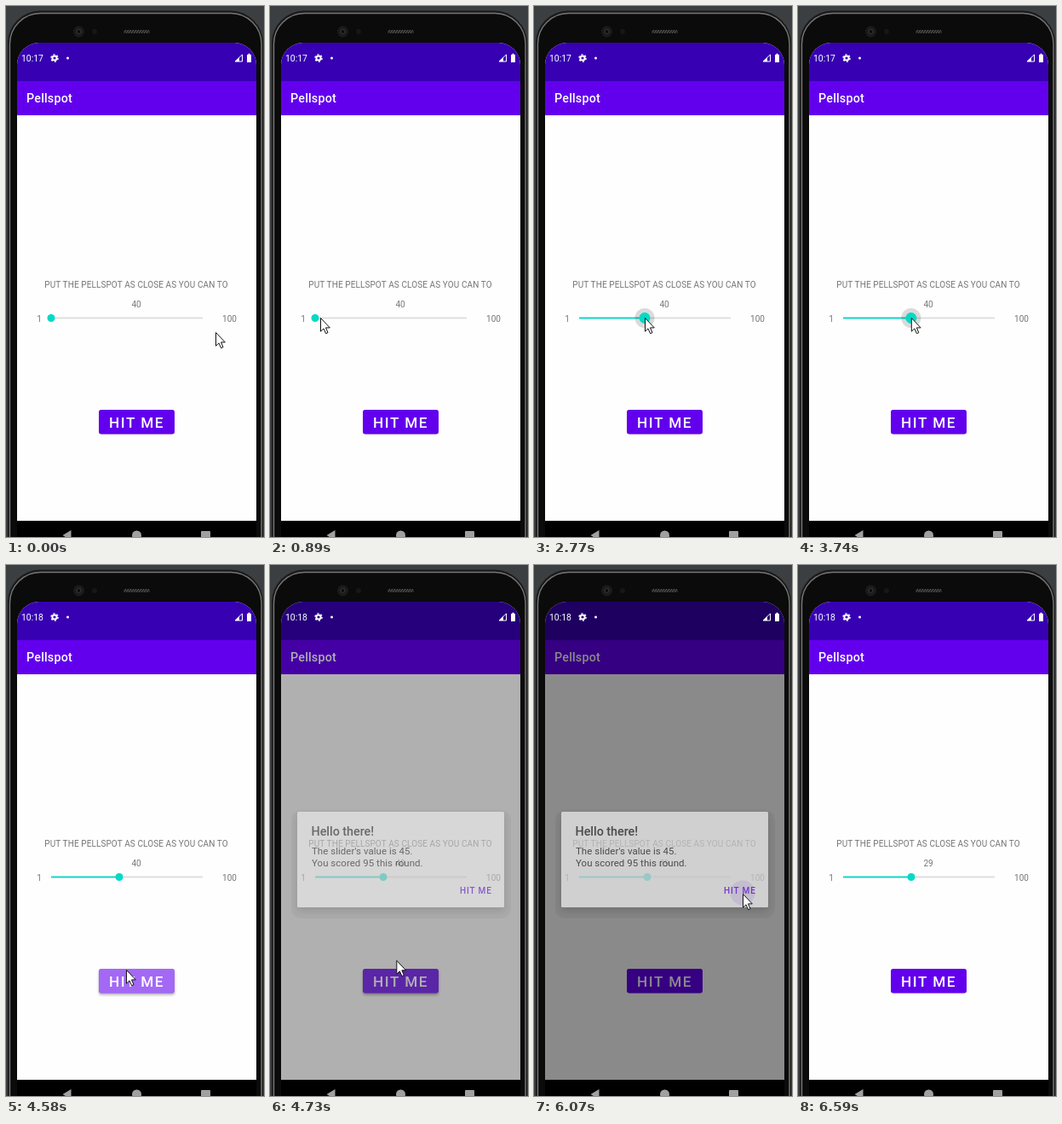
Write an HTML page that moves like this. It is 303 px wide and 622 px high and loops after 7.13 s.

```html
<!DOCTYPE html>
<html lang="en">
<head>
<meta charset="utf-8">
<title>Slider game</title>
<style>
  html, body { margin: 0; width: 100%; height: 100%; overflow: hidden; background: #3c3f41; }
  svg { display: block; width: 303px; height: 622px; }
  text { font: 10px Roboto, sans-serif; white-space: pre; }
  .label { fill: #757575; text-anchor: middle; }
  .medium { font-weight: 500; }
  .title { font-size: 14.3px; font-weight: 500; }
  .body { font-size: 11.44px; fill: #222; letter-spacing: .05px; }
  #button { filter: drop-shadow(0 .5px .5px rgba(0,0,0,.25)); }
  #button.down { filter: drop-shadow(0 2px 1.8px rgba(0,0,0,.3)); }
  #card { filter: drop-shadow(0 4px 5px rgba(0,0,0,.25)); }
</style>
</head>
<body>
<svg viewBox="0 0 303 622">
  <defs>
    <clipPath id="screen"><path d="M13 603V69a26 26 0 0 1 26-26H268a26 26 0 0 1 26 26V603z"/></clipPath>
    <pattern id="mesh" width="3" height="4" patternUnits="userSpaceOnUse">
      <path d="M0 4L3 0" stroke="#666" stroke-width=".8"/>
    </pattern>
  </defs>

  <!-- phone body -->
  <rect x="2" y="5.500" width="300" height="680" rx="38" fill="#1a1a1a"/>
  <rect x="4.500" y="8.500" width="295.500" height="680" rx="36" fill="#0b0b0b" stroke="#777" stroke-width="1.400"/>
  <circle cx="85.500" cy="30" r="6.500" fill="#1b1b1b"/>
  <circle cx="85.500" cy="30" r="2.500" fill="#0c0c0c" stroke="#3a3a3a"/>
  <circle cx="104" cy="30" r="3" fill="#171717"/>
  <rect x="138" y="28" width="31" height="4" rx="2" fill="#222"/>
  <rect x="138" y="28" width="31" height="4" rx="2" fill="url(#mesh)"/>
  <rect x="13" y="603" width="281" height="19"/>
  <g fill="#a0a0a0">
    <path d="M66.500 620L76.500 614V626z"/>
    <circle cx="153.500" cy="620" r="5.500"/>
    <rect x="229" y="615" width="11" height="11" rx="1"/>
  </g>

  <g clip-path="url(#screen)">
    <rect x="13" y="43" width="281" height="560" fill="#fefefe"/>
    <rect x="13" y="43" width="281" height="45" fill="#3700b3"/>
    <rect x="13" y="88" width="281" height="40" fill="#6200ee"/>
    <text class="title" x="24" y="113" fill="#fff" letter-spacing=".2">Pellspot</text>
    <text class="label" x="153" y="330" letter-spacing=".1">PUT THE PELLSPOT AS CLOSE AS YOU CAN TO</text>
    <text class="label" x="153" y="353" id="goal">40</text>
    <text class="label" x="39" y="369.500">1</text>
    <text class="label" x="262.500" y="369.500">100</text>

    <rect x="53" y="364.600" width="178" height="1.800" fill="#dcdcdc"/>
    <rect x="53" y="364.600" height="1.800" fill="#03dac5" id="fill"/>
    <circle cy="365.500" r="11.500" fill-opacity=".14" id="halo"/>
    <circle cy="365.500" fill="#03dac5" id="thumb"/>

    <g id="button">
      <rect x="109" y="473" width="89" height="28.500" rx="3" fill="#6200ee"/>
      <rect x="109" y="473" width="89" height="28.500" rx="3" fill="#fff" id="flash"/>
      <text class="medium" x="121" y="494" fill="#fff" style="font-size:17.2px" letter-spacing="1.53">HIT ME</text>
    </g>

    <rect x="13" y="43" width="281" height="560" id="dim"/>

    <g id="dialog">
      <rect x="25" y="288" width="258" height="126" rx="11" fill-opacity=".07"/>
      <rect x="32" y="289" width="243" height="112" rx="1.500" fill="#fff" id="card"/>
      <text class="title" x="48.500" y="317" fill="#212121">Hello there!</text>
      <text class="body" x="49" y="339">The slider's value is 45.</text>
      <text class="body" x="49" y="352.500">You scored 95 this round.</text>
      <circle cx="245" cy="384" r="14.500" fill="#6200ee" fill-opacity=".13" id="tap"/>
      <text class="medium" x="223" y="385.400" fill="#6200ee" letter-spacing=".89">HIT ME</text>
    </g>
  </g>

  <!-- status icons stay above the dimming -->
  <g fill="#fff">
    <text x="18" y="65" style="font-size:10.4px" id="clock">10:17</text>
    <circle cx="57" cy="61" r="2.600" fill="none" stroke="#fff" stroke-width="2"/>
    <circle cx="57" cy="61" r="4.100" fill="none" stroke="#fff" stroke-width="1.400" stroke-dasharray="2.150"/>
    <circle cx="72.500" cy="61" r="1.500"/>
    <path d="M269 65L277.500 57V65z" fill="none" stroke="#fff"/>
    <path d="M269 65L274 60V65z"/>
    <path d="M283 57h1.500v-1.200h2V57h1.500v9h-5z"/>
  </g>

  <path id="cursor" d="M.5.5V16.200L4 12.900L6.600 18.700L9 17.600L6.500 11.900H11.300z" fill="#fff" stroke="#111" stroke-linejoin="round"/>
</svg>
<script>
  const LOOP = 7130, STEP = LOOP / 54;
  const DRAG = 1040, DROP = 4000, MINUTE = 4140, PRESS = 4420, OPEN = 4880, CLOSE = 6070;
  const $ = id => document.getElementById(id);
  const set = (id, attrs) => {
    for (const name in attrs) $(id).setAttribute(name, attrs[name]);
  };

  const ramp = (t, from, to) => Math.min(1, Math.max(0, (t - from) / (to - from)));
  const ease = p => p * p * (3 - 2 * p);

  // pointer gestures: begin, end, goal x, goal y, sag of the path
  const moves = [
    [60, 820, 59, 365, 45],
    [1060, 1560, 108, 365, 0],
    [2270, 2770, 130, 365, 0],
    [3450, 3740, 133, 365, 0],
    [3800, 4220, 141, 474, 0],
    [4630, 5390, 245, 385, -22],
    [6090, 6570, 250, 640, 0]
  ];

  function pointer(t) {
    let x = 246, y = 382;
    for (const [begin, end, goalX, goalY, sag] of moves) {
      const p = ease(ramp(t, begin, end));
      x += (goalX - x) * p;
      y += (goalY - y) * p + sag * Math.sin(Math.PI * p);
    }
    return [x, y];
  }

  function draw(t) {
    // motion advances in even ticks
    const tick = Math.floor(t / STEP + .35) * STEP;
    const [x, y] = pointer(tick);
    const held = t >= DRAG + STEP && t < DROP;
    const knob = t < DRAG ? 53 : Math.min(x, 133);

    set('cursor', { transform: `translate(${x} ${y})` });
    set('thumb', { cx: knob, r: held ? 6.5 : 4.5 });
    set('halo', { cx: knob, opacity: +held });
    set('fill', { width: knob - 53 });
    set('flash', { opacity: .41 * (ramp(tick, 4350, 4600) - ramp(tick, 4630, OPEN)) });
    set('button', { class: t >= PRESS && t < OPEN ? 'down' : '' });
    set('dim', { opacity: .6 * (ramp(tick, 4630, 4870) - ramp(tick, 6000, 6310)) });
    set('dialog', { opacity: ramp(tick, 4640, 4870) - ramp(tick, 5990, 6200) });
    set('tap', { opacity: +(t >= CLOSE) });
    $('clock').textContent = t < MINUTE ? '10:17' : '10:18';
    $('goal').textContent = t < CLOSE ? 40 : 29;
  }

  const start = performance.now();
  function loop() {
    draw((performance.now() - start) % LOOP);
    requestAnimationFrame(loop);
  }
  loop();
</script>
</body>
</html>
```
